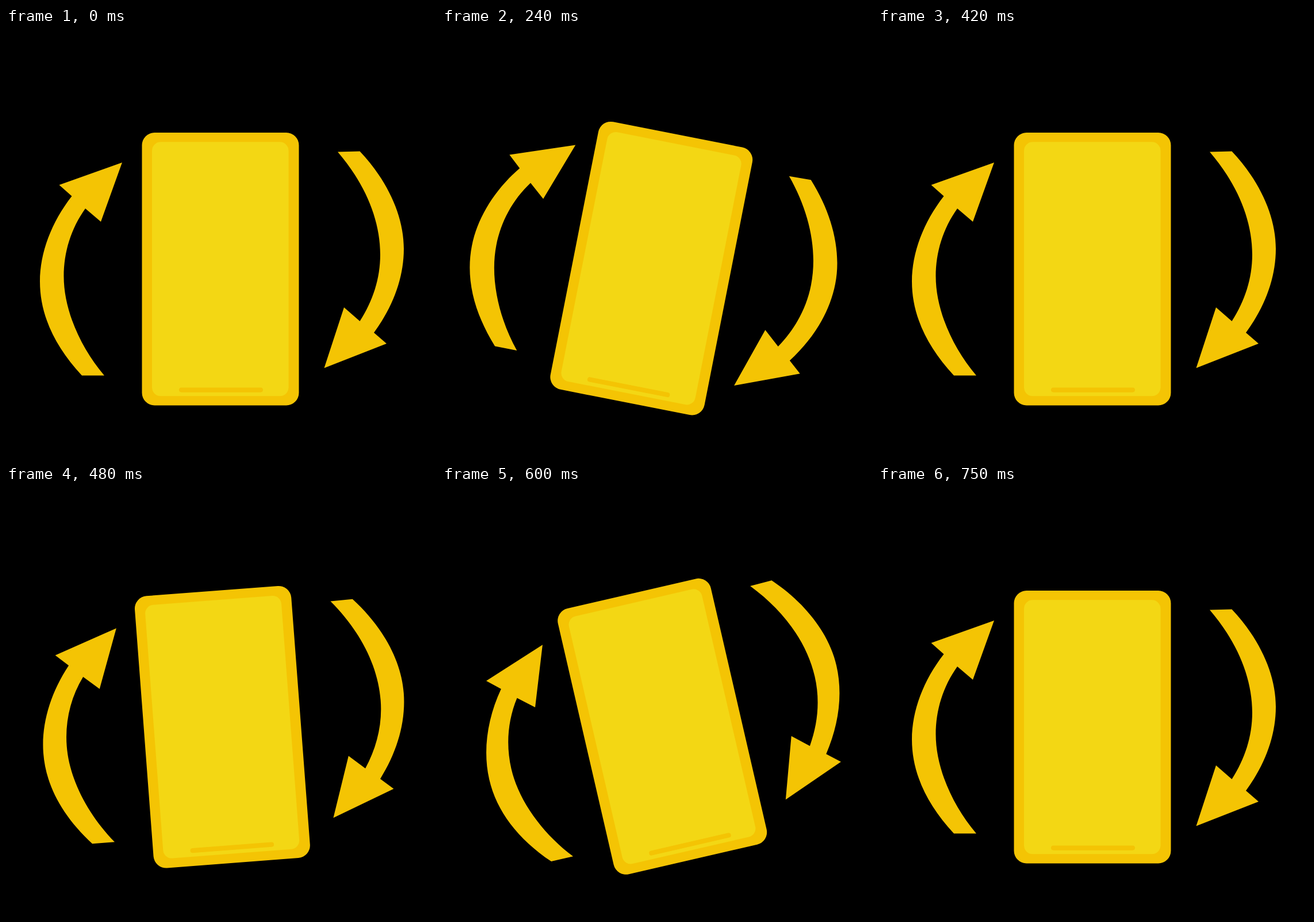
Write an HTML page that moves like this. It is 748 px wide and 748 px high and loops after 1800 ms.

```html
<!DOCTYPE html>
<html lang="en">
<head>
<meta charset="utf-8">
<title>Rotate the phone</title>
<style>
  html, body { margin: 0; width: 100%; height: 100%; overflow: hidden; background: #000; }
  svg { display: block; width: 100%; height: 100%; }
</style>
</head>
<body>
<svg viewBox="0 0 748 748">
  <g id="scene" fill="#f4c404">
    <rect x="236.5" y="182" width="273" height="474.5" rx="22"/>
    <rect x="254" y="198.3" width="237.5" height="442" rx="15" fill="#f3d714"/>
    <rect x="301" y="625.5" width="146" height="8.2" rx="4.1"/>
    <path d="M202 234L92.5 273L114.5 292.5C79 338 59 391 59 441C59 498 84 553 132 604.5H171
             C129 555 100.5 490 100.5 432C100.5 390 113 349 138 314L165 337Z"/>
    <path d="M553.5 591.5L662 549L640 530C673 485 692 435 692 384C692 327 664 266 615.5 214.5L577 215.5
             C624 270 651 333 651 394C651 436 638 475 615.5 510L588 486Z"/>
  </g>
</svg>
<script>
  const LOOP = 1800, STEP = 30;
  // Tilt keyframes, joined linearly: [ms, degrees]
  const keys = [[0, 0], [210, 13], [420, 0], [600, -13], [750, 0], [LOOP, 0]];
  const scene = document.getElementById('scene');

  function tilt(t) {
    const i = keys.findIndex(([end]) => t < end);
    const [t0, a0] = keys[i - 1], [t1, a1] = keys[i];
    return a0 + (a1 - a0) * (t - t0) / (t1 - t0);
  }

  const start = performance.now();
  function draw() {
    const t = (performance.now() - start) % LOOP;
    const angle = tilt(Math.floor(t / STEP) * STEP);
    scene.setAttribute('transform', `rotate(${angle} 374 374)`);
    requestAnimationFrame(draw);
  }
  draw();
</script>
</body>
</html>
```
